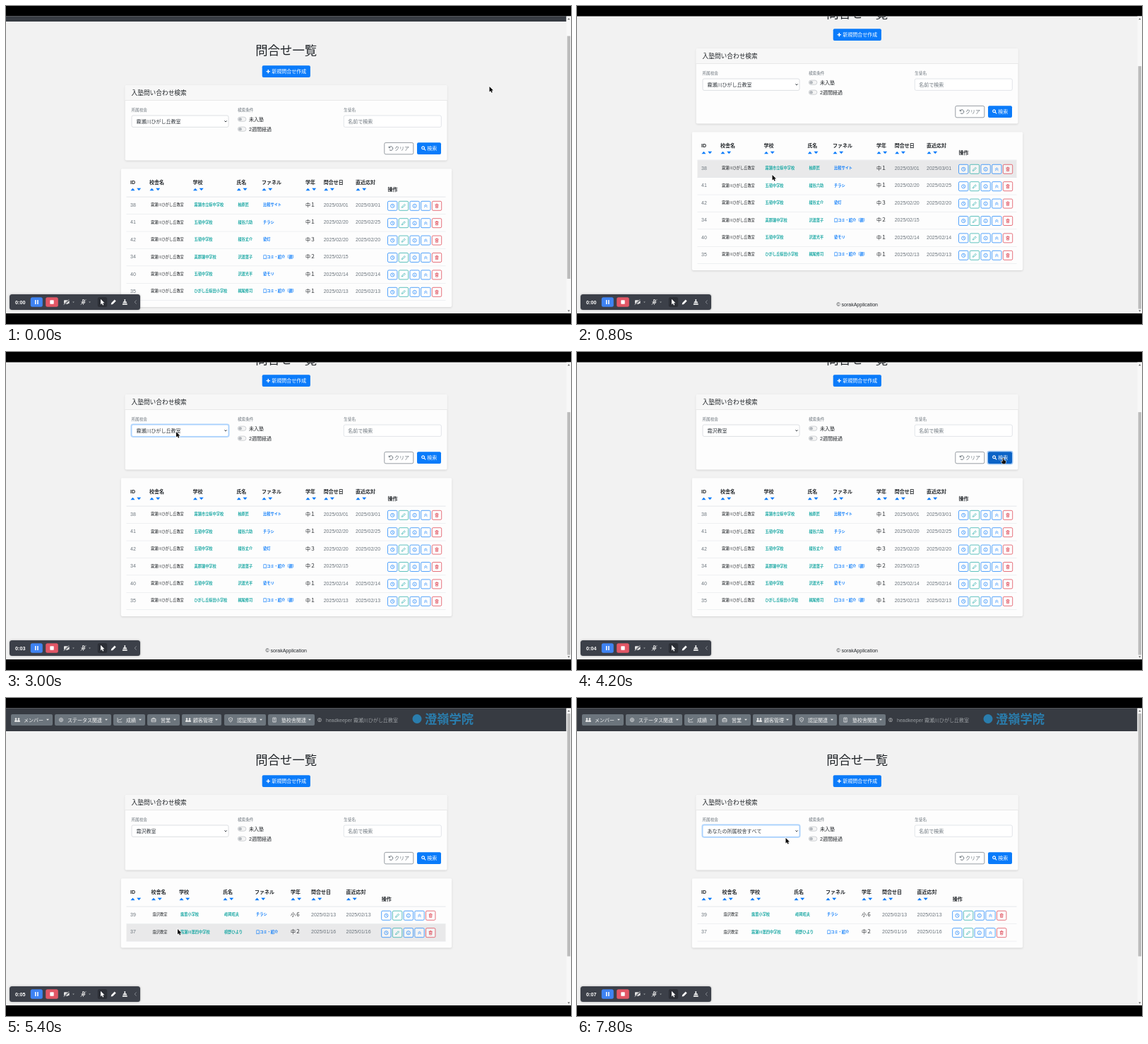
Recreate the animation shown at these times as an HTML page with a canvas. Size 800 px wide and 450 px high, loop 8 s.

```html
<!DOCTYPE html>
<html lang="ja">
<head>
<meta charset="utf-8">
<title>問合せ一覧</title>
<style>
html, body { margin: 0; width: 100%; height: 100%; overflow: hidden; background: #000; }
canvas { display: block; width: 800px; height: 450px; }
</style>
</head>
<body>
<canvas id="stage"></canvas>
<script>
const canvas = document.getElementById('stage');
const ctx = canvas.getContext('2d');
const ratio = Math.max(1, window.devicePixelRatio || 1);
canvas.width = 800 * ratio;
canvas.height = 450 * ratio;

const LOOP = 8000, STEP = 200;
const FONT = '"Liberation Sans", "Noto Sans CJK JP", "Noto Sans CJK", sans-serif';
const INK = '#212529', GRAY = '#6c757d', BLUE = '#0a7bfa', TEAL = '#1ba8a4', RED = '#dc3545';
const BRANCH_A = '霧瀬川ひがし丘教室', BRANCH_B = '霜沢教室';
const SCROLL_END = 77;
const ROW_TOP = 295.5, ROW_H = 24.4;

// Drawing helpers
function text(s, x, y, color = INK, size = 7, weight = 400, align = 'left') {
  ctx.font = `${weight} ${size}px ${FONT}`;
  ctx.fillStyle = color;
  ctx.textAlign = align;
  ctx.fillText(s, x, y + size * 0.37);
}

function rect(x, y, w, h, color) {
  ctx.fillStyle = color;
  ctx.fillRect(x, y, w, h);
}

function box(x, y, w, h, r, fill, stroke, lw = 0.6) {
  ctx.beginPath();
  ctx.roundRect(x, y, w, h, r);
  if (fill) { ctx.fillStyle = fill; ctx.fill(); }
  if (stroke) { ctx.strokeStyle = stroke; ctx.lineWidth = lw; ctx.stroke(); }
}

function icon(path, x, y, color, lw = 0.8, fill = false) {
  ctx.save();
  ctx.translate(x, y);
  ctx.lineWidth = lw;
  ctx.fillStyle = ctx.strokeStyle = color;
  const p = new Path2D(path);
  if (fill) ctx.fill(p);
  if (lw) ctx.stroke(p);
  ctx.restore();
}

function triangle(x, y, w, h, color) {
  icon(`M${-w / 2} ${-h / 2}H${w / 2}L0 ${h / 2}Z`, x, y, color, 0, true);
}

function card(x, y, w, h) {
  ctx.save();
  ctx.shadowColor = 'rgba(0,0,0,.13)';
  ctx.shadowBlur = 3 * ratio;
  ctx.shadowOffsetY = ratio;
  box(x, y, w, h, 2, '#fdfdfd');
  ctx.restore();
}

const CIRCLE = 'M2.6 0A2.6 2.6 0 1 1 -2.6 0A2.6 2.6 0 1 1 2.6 0Z';
const PENCIL = 'M-2.5 2.5L-2 .8L1.3 -2.5L2.5 -1.3L-.8 2Z';
const POINTER = 'M0 0V7.6L1.8 6L3 8.7L4.3 8.1L3.1 5.5H5.5Z';
const PEOPLE = 'M-3.5 2.4V1Q-2 -.6 -.4 1V2.4ZM.3 2.4V1Q1.8 -.6 3.5 1V2.4ZM-3 -1.4A1 1 0 1 1 -1 -1.4A1 1 0 1 1 -3 -1.4M1 -1.4A1 1 0 1 1 3 -1.4A1 1 0 1 1 1 -1.4';

// Motion
const ease = k => { k = Math.min(1, Math.max(0, k)); return k * k * (3 - 2 * k); };
const mix = (a, b, k) => a + (b - a) * k;

const MOUSE = [
  [0, 684.5, 114], [800, 276.5, 239], [1200, 264, 185], [1800, 241, 113],
  [3200, 241, 113], [3400, 236, 146], [4000, 603.5, 150], [4600, 603.5, 150],
  [5400, 243, 327], [5800, 245, 306], [6000, 239, 214], [6600, 239, 184],
  [7200, 239, 184], [7400, 295.5, 198], [LOOP, 295.5, 198]
];

function mouseAt(t) {
  const i = MOUSE.findIndex(p => p[0] > t);
  const [t0, x0, y0] = MOUSE[i - 1], [t1, x1, y1] = MOUSE[i];
  const k = ease((t - t0) / (t1 - t0));
  return { x: mix(x0, x1, k), y: mix(y0, y1, k) };
}

function stateAt(t) {
  const mouse = mouseAt(t);
  const found = t >= 4400;
  const scroll = found ? 0 : mix(25, SCROLL_END, ease(t / 600));
  const pageY = mouse.y + scroll;
  return {
    t, mouse, found, scroll, pageY,
    branch: t < 3400 ? BRANCH_A : t < 7400 ? BRANCH_B : 'あなたの所属校舎すべて',
    selectFocus: (t >= 1800 && t < 4200) || t >= 6600,
    overSearch: mouse.x > 582 && mouse.x < 616 && pageY > 218 && pageY < 235,
    pressed: t >= 4200 && t < 4400
  };
}

// Page parts, laid out for the unscrolled page
const NAV = [
  [7, 59, 25, 'メンバー', PEOPLE],
  [69, 80, 87, 'ステータス関連', CIRCLE + 'M1 0A1 1 0 1 1 -1 0A1 1 0 1 1 1 0'],
  [152, 45, 170, '成績', 'M-3 -3V3H3.3M-2 1L-.4 -1L.8 .3L3 -2.4'],
  [200, 46, 219, '営業', 'M-3 -1.5H3V2.6H-3ZM-1.2 -1.5V-2.7H1.2V-1.5M-3 .5H3'],
  [249, 56, 265, '顧客管理', PEOPLE],
  [309, 59, 327, '認証関連', 'M0 -3.2L2.6 -2.3Q2.8 1.4 0 3.2Q-2.8 1.4 -2.6 -2.3ZM0 -1V1'],
  [371, 66, 390, '塾校舎関連', 'M-2.2 3V-3H2.2V3ZM-1 -1.6H1M-1 0H1M0 1.4V3']
];

function drawNav() {
  rect(0, 14, 793.5, 33, '#373b42');
  for (const [x, w, tx, label, path] of NAV) {
    box(x, 23, w, 16, 2, '#6c757d');
    icon(path, x + 9, 31, '#f0f0f0', 0.7, path === PEOPLE);
    text(label, tx, 31, '#f4f4f4');
    triangle(x + w - 7, 30.8, 3.8, 2, '#f0f0f0');
  }
  icon(CIRCLE + 'M1 -.6A1 1 0 1 1 -1 -.6A1 1 0 1 1 1 -.6M-1.7 1.9Q0 .2 1.7 1.9', 444, 31, '#a4a7aa', 0.7);
  text('headkeeper ' + BRANCH_A, 453, 31, '#999da1');
  ctx.beginPath();
  ctx.arc(582, 29.5, 6.5, 0, Math.PI * 2);
  ctx.fillStyle = '#2a7dad';
  ctx.fill();
  text('澄嶺学院', 593, 30, '#2a7dad', 17.3, 700);
}

function drawSelect(s) {
  if (s.selectFocus) box(177.3, 179.3, 138.4, 17.8, 2.5, null, '#b8d8fb', 1.6);
  box(178, 180, 137, 16.4, 2, '#fff', s.selectFocus ? '#80bdff' : '#c6cbd0');
  text(s.branch, 184.5, 188, '#343a40');
  icon('M-1.6 -.8L0 .8L1.6 -.8', 311, 188.2, '#343a40', 1);
}

function drawToggle(y, label) {
  box(328.3, y - 3.1, 11.6, 6.2, 3.1, '#f4f4f4', '#b4b9be');
  ctx.beginPath();
  ctx.arc(331.6, y, 2.3, 0, Math.PI * 2);
  ctx.fillStyle = '#b4b9be';
  ctx.fill();
  text(label, 344, y);
}

function drawSearch(s) {
  text('問合せ一覧', 396.7, 88, INK, 17.4, 400, 'center');
  box(362.7, 109.3, 68.2, 16.6, 2, BLUE);
  icon('M-2.7 0H2.7M0 -2.7V2.7', 371.3, 117.6, '#fff', 1.4);
  text('新規問合せ作成', 376.3, 117.6, '#fff');

  card(168.7, 137, 455.8, 106.5);
  box(168.7, 137, 455.8, 21.3, [2, 2, 0, 0], '#f7f7f7');
  rect(168.7, 158, 455.8, 0.6, '#dcdcdc');
  text('入塾問い合わせ検索', 177.5, 147.4, INK, 8.7);
  text('所属校舎', 177.5, 172.4, GRAY, 5.6);
  text('検索条件', 328, 172.4, GRAY, 5.6);
  text('生徒名', 478.3, 172.4, GRAY, 5.6);
  drawSelect(s);
  drawToggle(185.2, '未入塾');
  drawToggle(199.2, '2週間経過');
  box(478.3, 180, 138, 16.4, 2, '#fff', '#ced4da');
  text('名前で検索', 484.3, 188, GRAY);

  box(535.8, 218.4, 41, 16.4, 2, '#fff', GRAY, 0.7);
  icon('M-2.8 -2.8V-.8H-.8M-2.6 -1A2.8 2.8 0 1 1 -2 2', 545, 226.5, GRAY, 1);
  text('クリア', 550, 226.5, GRAY);
  if (s.pressed) box(581.3, 217.6, 35.4, 18, 2.5, null, '#a5cbf5', 1.6);
  box(582, 218.2, 34, 16.8, 2, s.overSearch ? '#0b63c6' : BLUE);
  icon('M1.2 -.6A1.9 1.9 0 1 1 -2.6 -.6A1.9 1.9 0 1 1 1.2 -.6M.7 .8L2.9 3', 591.3, 226.4, '#fff', 1.1);
  text('検索', 596.3, 226.5, '#fff');
}

const HEADS = ['ID', '校舎名', '学校', '氏名', 'ファネル', '学年', '問合せ日', '直近応対', '操作'];
const WIDE = [176, 203, 264.5, 326.3, 362, 424, 449.7, 495, 540.5];
const NARROW = [176, 205.5, 245, 307, 352, 403, 432, 481.5, 531.7];

const ALL_ROWS = [
  ['38', BRANCH_A, '霧瀬市立椋中学校', '柚原匠', '比較サイト', '中１', '2025/03/01', '2025/03/01'],
  ['41', BRANCH_A, '五嶺中学校', '榎谷六助', 'チラシ', '中１', '2025/02/20', '2025/02/25'],
  ['42', BRANCH_A, '五嶺中学校', '榎谷丈介', '塾灯', '中３', '2025/02/20', '2025/02/20'],
  ['34', BRANCH_A, '美那瀬中学校', '沢渡葉子', '口コミ・紹介（親）', '中２', '2025/02/15', ''],
  ['40', BRANCH_A, '五嶺中学校', '沢渡光平', '塾モリ', '中１', '2025/02/14', '2025/02/14'],
  ['35', BRANCH_A, 'ひがし丘椋田小学校', '梶尾修司', '口コミ・紹介（親）', '中１', '2025/02/13', '2025/02/13']
];
const FOUND_ROWS = [
  ['39', BRANCH_B, '露葉小学校', '峰岡昭夫', 'チラシ', '小６', '2025/02/13', '2025/02/13'],
  ['37', BRANCH_B, '霧瀬川第四中学校', '槙野ひより', '口コミ・紹介', '中２', '2025/01/16', '2025/01/16']
];
const CELL_COLORS = [GRAY, INK, TEAL, TEAL, BLUE, INK, GRAY, GRAY];

const ACTIONS = [
  [BLUE, CIRCLE + 'M0 -1.5V0L1.2 .8'],
  [TEAL, PENCIL],
  [BLUE, CIRCLE + 'M0 -.3V1.5M0 -1.6V-1'],
  [BLUE, 'M-2.2 0L0 -1.8L2.2 0M-2.2 2L0 .2L2.2 2'],
  [RED, 'M-2.4 -1.8H2.4M-.8 -1.8V-2.7H.8V-1.8M-1.8 -1.8L-1.5 2.7H1.5L1.8 -1.8M-.5 -.6V1.6M.5 -.6V1.6']
];

function drawRow(row, cols, y) {
  row.forEach((value, i) => {
    const small = i > 0 && i < 5;
    const bold = i > 1 && i < 5;
    text(value, cols[i] + (small ? 2.1 : 0), y, CELL_COLORS[i], small ? 5.2 : 7, bold ? 700 : 400);
  });
  ACTIONS.forEach(([color, path], i) => {
    const x = cols[8] + i * 15.7;
    box(x, y - 5.2, 13.4, 13, 1.6, 'rgba(255,255,255,.5)', color, 0.7);
    icon(path, x + 6.7, y + 1.4, color, 0.65);
  });
}

function drawTable(s) {
  const rows = s.found ? FOUND_ROWS : ALL_ROWS;
  const cols = s.found ? NARROW : WIDE;
  card(162.8, 255.3, 468.4, 49.4 + ROW_H * rows.length);
  HEADS.forEach((head, i) => {
    const last = i === 8;
    text(head, cols[i], last ? 284.6 : 274, INK, 7, 700);
    if (last) return;
    triangle(cols[i] + 3.5, 284.5, 6, -3.4, BLUE);
    triangle(cols[i] + 12.2, 284.5, 6, 3.4, BLUE);
  });
  rect(170.5, ROW_TOP - 0.8, 452, 0.8, '#dee2e6');
  rows.forEach((row, i) => {
    const top = ROW_TOP + ROW_H * i;
    const hover = s.mouse.x > 170 && s.mouse.x < 622 && s.pageY >= top && s.pageY < top + ROW_H;
    if (hover) rect(170.5, top, 452, ROW_H, '#e9e9ea');
    rect(170.5, top + ROW_H - 0.5, 452, 0.5, '#dee2e6');
    drawRow(row, cols, top + 11);
  });
}

function drawScrollbar(scroll) {
  rect(793.5, 14, 6.5, 421, '#f8f8f8');
  rect(794.6, 22 + scroll * 0.82, 4.4, 343.5, '#bcbcbc');
  triangle(796.8, 18.3, 3.4, -2, '#555');
  triangle(796.8, 431.5, 3.4, 2, '#555');
}

function drawRecorder(t) {
  ctx.save();
  ctx.shadowColor = 'rgba(0,0,0,.3)';
  ctx.shadowBlur = 3 * ratio;
  box(5, 408, 185, 22, 3.5, '#3c4049');
  ctx.restore();
  text('0:0' + Math.floor(t / 1000), 13, 419, '#fff', 7.2, 700);
  box(34.8, 412.3, 17, 13.4, 2.5, '#3f83f2');
  rect(41, 416, 1.5, 6, '#fff');
  rect(44.2, 416, 1.5, 6, '#fff');
  box(56.2, 412.3, 17.6, 13.4, 2.5, '#e25766');
  box(62.3, 416.3, 5.4, 5.4, 0.6, '#fff');
  icon('M-3 -2.2H2V2.2H-3ZM2 -.6L3.6 -1.8V1.8L2 .6', 85.5, 419, '#e8e8e8', 1, true);
  icon('M-3.5 3.6L3.8 -3.8', 85.8, 419, '#3c4049', 2);
  icon('M-3.6 3.7L3.6 -3.6', 85.4, 419, '#e8e8e8', 0.9);
  icon('M-1 -3H1V.8H-1ZM-2.6 -.4Q-2.4 2.4 0 2.4Q2.4 2.4 2.6 -.4M0 2.4V4', 109.5, 418.6, '#e8e8e8', 0.9);
  icon('M-3.6 3.6L3.6 -3.6', 109.5, 419, '#e8e8e8', 0.9);
  triangle(95.5, 419.3, 2.6, 1.5, '#a8abb0');
  triangle(118.5, 419.3, 2.6, 1.5, '#a8abb0');
  box(129.8, 412, 13.4, 14, 2.5, '#2c2f36');
  icon(POINTER, 134, 414.8, '#fff', 0, true);
  icon('M-3.6 3.6L-2.9 1L1.6 -3.5L3.5 -1.6L-1 2.9Z', 152.2, 419, '#fff', 0, true);
  icon('M-.8 -4H.8V-.8H2.2L2.8 1H-2.8L-2.2 -.8H-.8ZM-3 1.7H3L3.6 3.7H-3.6Z', 168.3, 419, '#f2f2f2', 0, true);
  icon('M1.2 -2.6L-1.2 0L1.2 2.6', 183.4, 419, '#8a8e95', 0.9);
}

function drawMouse(s) {
  const { x, y } = s.mouse;
  if (s.overSearch) {
    const hand = 'M-.8 .4Q0 -.5 .8 .4V3L3.2 3.7Q4 4 3.8 5L3 8.2H-.9L-3 5Q-2.6 3.9 -.8 5Z';
    icon(hand, x, y, '#fff', 1.1);
    icon(hand, x, y, '#111', 0, true);
  } else {
    icon(POINTER, x, y, '#fff', 1.3);
    icon(POINTER, x, y, '#080808', 0, true);
  }
}

function draw(t) {
  const s = stateAt(t);
  ctx.setTransform(ratio, 0, 0, ratio, 0, 0);
  rect(0, 0, 800, 450, '#000');
  ctx.save();
  ctx.beginPath();
  ctx.rect(0, 14.5, 800, 420.5);
  ctx.clip();
  rect(0, 14, 800, 421, '#f2f2f2');
  ctx.save();
  ctx.translate(0, -s.scroll);
  drawNav();
  drawSearch(s);
  drawTable(s);
  text('© sorakApplication', 396.7, 499.5, INK, 7, 400, 'center');
  ctx.restore();
  drawScrollbar(s.scroll);
  drawRecorder(t);
  drawMouse(s);
  ctx.restore();
}

function frame() {
  const t = performance.now() % LOOP;
  draw(Math.floor(t / STEP) * STEP);
  requestAnimationFrame(frame);
}
frame();
</script>
</body>
</html>
```
